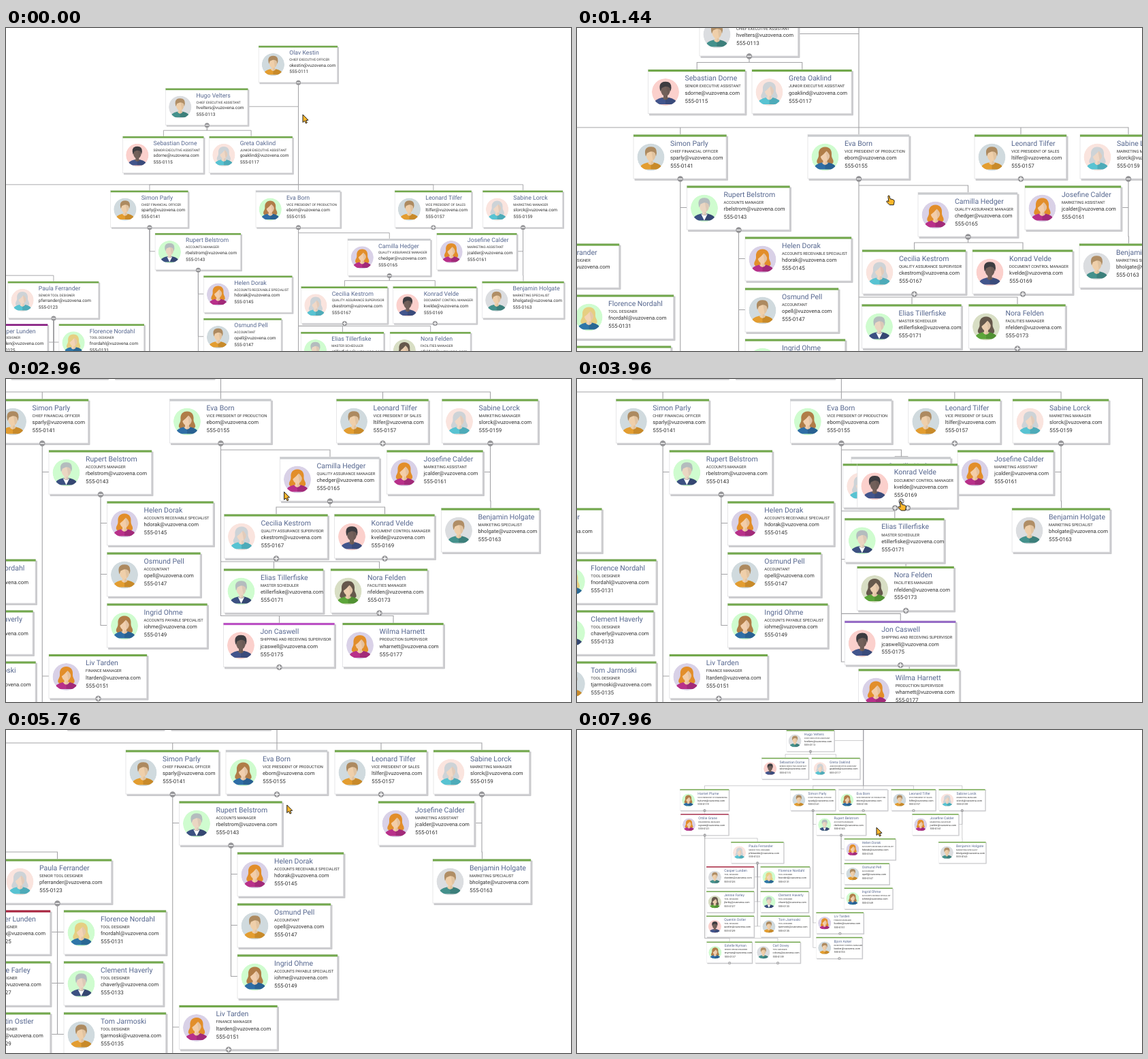
Recreate the animation shown at these times as an HTML page. Size 830 by 474 pixels, loop 8000 ms.

```html
<!DOCTYPE html>
<html lang="en">
<head>
<meta charset="utf-8">
<title>Organization chart</title>
<style>
html, body { margin: 0; width: 100%; height: 100%; overflow: hidden; background: #fff; }
svg { display: block; width: 100vw; height: 100vh; }
text { font-family: Roboto, Arial, sans-serif; text-rendering: geometricPrecision; fill: #333; }
.name { font-size: 10.5px; fill: #56678f; }
.title { font-size: 5.75px; }
.mail { font-size: 7.75px; }
.phone { font-size: 8px; }
</style>
</head>
<body>
<svg id="stage" viewBox="0 0 830 474">
  <defs><clipPath id="disc"><circle r="20"/></clipPath></defs>
  <g id="world">
    <path id="links" fill="none" stroke="#a3a3a6" stroke-width="1.1"/>
    <g id="cards"></g>
    <g id="knobs"></g>
  </g>
  <g id="cursor" stroke="#222" stroke-width="1" stroke-linejoin="round" fill="#fdb72b">
    <path id="arrow" d="M0 0V11.5L2.7 9.2 4.5 13 6.4 12 4.7 8.5 8 8.2Z"/>
    <path id="hand" d="M-1 0Q0-1.6 1.2 0L2 4 6.5 5.2Q8.5 5.8 8.3 8L7.3 13H1.2L-3 8.6Q-3.4 6.8-1.6 7.2L0 8.2Z"/>
  </g>
</svg>
<script>
const LOOP = 8000, H = 67.5, ROW = 75;
const $ = id => document.getElementById(id);

// background, hair, skin, shirt, hair style
const looks = {
  m1: ['#d0dade', '#ad8a60', '#efcfaa', '#e39d30', 'short'],
  m2: ['#dbdde0', '#b08e66', '#efcfaa', '#44918c', 'short'],
  m3: ['#fbd0cc', '#3d3c40', '#72605a', '#42558c', 'short'],
  m4: ['#cffccf', '#b4bcbe', '#ead6c2', '#3c5182', 'suit'],
  w1: ['#fae4de', '#cdd3d7', '#f0d8c6', '#58c3d2', 'long'],
  w2: ['#cffccf', '#b07d48', '#f1cfae', '#2f6ea6', 'long'],
  w3: ['#d9d1e7', '#e28e2a', '#f3cda8', '#b8308a', 'long'],
  w4: ['#d8dec4', '#66584c', '#ecceb0', '#5ca53a', 'long'],
  w5: ['#cffccf', '#e6cf82', '#f3d4b4', '#2f76a8', 'long']
};

// group shifts of the two collapses: [first, second]
const shifts = { U: [0, 0], D: [0, 109], R: [-81, -4], G: [-83, -12] };

// name, title, look, parent, group, x, y, width, flags (s: side link, p: folded)
const people = [
  ['Olav Kestin', 'CHIEF EXECUTIVE OFFICER', 'm1', -1, 'U', 5, -255, 140],
  ['Hugo Velters', 'CHIEF EXECUTIVE ASSISTANT', 'm2', 0, 'U', -159, -180, 146, 's'],
  ['Sebastian Dorne', 'SENIOR EXECUTIVE ASSISTANT', 'm3', 1, 'U', -234.5, -95.5, 143.5],
  ['Greta Oaklind', 'JUNIOR EXECUTIVE ASSISTANT', 'w1', 1, 'U', -82, -95.5, 147.5],
  ['Harriet Plume', 'VICE PRESIDENT OF ENGINEERING', 'w2', 0, 'D', -592.5, 0, 150],
  ['Ottilie Grane', 'ENGINEERING MANAGER', 'w3', 4, 'D', -590.5, ROW, 147],
  ['Paula Ferrander', 'SENIOR TOOL DESIGNER', 'w1', 5, 'D', -437, 160, 161],
  ['Casper Lunden', 'TOOL DESIGNER', 'm2', 6, 'D', -512, 235, 146, 's'],
  ['Jennie Farley', 'TOOL DESIGNER', 'w4', 6, 'D', -512, 310, 146, 's'],
  ['Quentin Ostler', 'TOOL DESIGNER', 'm3', 6, 'D', -512, 385, 146, 's'],
  ['Florence Nordahl', 'TOOL DESIGNER', 'w5', 6, 'D', -347, 235, 151, 's'],
  ['Clement Haverly', 'TOOL DESIGNER', 'm4', 6, 'D', -347, 310, 147, 's'],
  ['Tom Jarmoski', 'TOOL DESIGNER', 'm1', 6, 'D', -347, 385, 151, 's'],
  ['Estelle Nyman', 'SENIOR DESIGN ENGINEER', 'w2', 5, 'D', -511, 464, 139, 'p'],
  ['Carl Dovey', 'TOOL MANAGER', 'm2', 5, 'D', -364, 464, 139, 'p'],
  ['Simon Parly', 'CHIEF FINANCIAL OFFICER', 'm1', 0, 'D', -256, 0, 137.5],
  ['Rupert Belstrom', 'ACCOUNTS MANAGER', 'm4', 15, 'D', -177.5, ROW, 152, 's'],
  ['Helen Dorak', 'ACCOUNTS RECEIVABLE SPECIALIST', 'w3', 16, 'D', -92, 150, 157, 's'],
  ['Osmund Pell', 'ACCOUNTANT', 'm1', 16, 'D', -92, 225, 138, 's'],
  ['Ingrid Ohme', 'ACCOUNTS PAYABLE SPECIALIST', 'w2', 16, 'D', -92, 300, 148, 's'],
  ['Liv Tarden', 'FINANCE MANAGER', 'w3', 15, 'D', -177.5, 374.5, 145, 'sp'],
  ['Bjorn Asker', 'INVENTORY CONTROL MANAGER', 'm1', 15, 'D', -177.5, 450, 141, 'sp'],
  ['Eva Born', 'VICE PRESIDENT OF PRODUCTION', 'w2', 0, 'U', 0, 0, 150],
  ['Leonard Tilfer', 'VICE PRESIDENT OF SALES', 'm1', 0, 'R', 245, 0, 136, 'p'],
  ['Sabine Lorck', 'MARKETING MANAGER', 'w1', 0, 'G', 400, 0, 142],
  ['Josefine Calder', 'MARKETING ASSISTANT', 'w3', 24, 'G', 319, ROW, 142, 's'],
  ['Benjamin Holgate', 'MARKETING SPECIALIST', 'm2', 24, 'G', 399, 160, 145],
  ['Camilla Hedger', 'QUALITY ASSURANCE MANAGER', 'w3', 22, 'K', 162, 85, 147],
  ['Cecilia Kestrom', 'QUALITY ASSURANCE SUPERVISOR', 'w1', 27, 'Q', 80, 169, 153, 'p'],
  ['Konrad Velde', 'DOCUMENT CONTROL MANAGER', 'm3', 27, 'Q', 242, 169, 148, 'p'],
  ['Elias Tillerfiske', 'MASTER SCHEDULER', 'm4', 22, 'K', 79.5, 249, 147],
  ['Nora Felden', 'FACILITIES MANAGER', 'w4', 22, 'K', 236.5, 249, 143, 'p'],
  ['Jon Caswell', 'SHIPPING AND RECEIVING SUPERVISOR', 'm3', 22, 'K', 79, 328.5, 164, 'p'],
  ['Wilma Harnett', 'PRODUCTION SUPERVISOR', 'w3', 22, 'K', 254, 328.5, 149]
];
const CHIEF = 5, DESIGNER = 7, PRODUCTION = 22, QUALITY = 27, SHIPPING = 32;

function avatar(look) {
  const [bg, hair, skin, shirt, style] = looks[look];
  const long = style === 'long';
  const back = long
    ? `<path d="M0-15C7-15 10-10 9.5-4C9 2 13 3 12 8Q10 11 6 10H-6Q-10 11-12 8C-13 3-9 2-9.5-4C-10-10-7-15 0-15Z" fill="${hair}"/>` : '';
  const top = long
    ? `<path d="M-7.5 0Q-9-14 0-14T7.5 0Q6-6 2-9Q-2-4-7.5 0Z" fill="${hair}"/>`
    : `<path d="M-7.5-1Q-11-13-3-15Q9-17 8.5-6L7.5-1 6.2-6Q3-9-1-8L-5.5-6Z" fill="${hair}"/>`;
  const collar = style === 'suit'
    ? '<path d="M-5 8L0 18 5 8 2 10H-2Z" fill="#fff"/>'
    : `<path d="M-5 8Q0 15 5 8Z" fill="${skin}"/>`;
  return `<g transform="translate(25.5 33)" clip-path="url(#disc)"><circle r="20" fill="${bg}"/>${back}
    <path d="M-17 18Q-16 10-5 8H5Q16 10 17 18Z" fill="${shirt}"/>
    <path d="M0 8H5Q16 10 17 18H0Z" fill="#000" opacity=".12"/>
    ${collar}<rect x="-3" y="3" width="6" height="7" fill="${skin}"/>
    <ellipse cy="-3.5" rx="7" ry="9.5" fill="${skin}"/>
    <path d="M0-13A7 9.5 0 0 1 0 6V12L3 10V4Z" fill="#000" opacity=".06"/>${top}</g>`;
}

function cardMarkup(p, i) {
  const [first, last] = p.name.split(' ');
  const mail = (first[0] + last).toLowerCase() + '@vuzovena.com';
  const line = (cls, y, s) => `<text class="${cls}" x="54" y="${y}">${s}</text>`;
  return `<rect x="1.5" y="2" width="${p.w}" height="${H - 2}" rx="1" fill="#cbcbce"/>
    <rect width="${p.w - 1.5}" height="${H - 3}" fill="#fff" stroke="#dcdcde" stroke-width=".7"/>
    <rect class="bar" width="${p.w - .8}" height="3.1" fill="#72a84c"/>` + avatar(p.look) +
    line('name', 16, p.name) + line('title', 26.4, p.title) +
    line('mail', 36.6, mail) + line('phone', 48.5, '555-01' + (11 + 2 * i));
}

function add(parent, html) {
  const g = document.createElementNS('http://www.w3.org/2000/svg', 'g');
  g.innerHTML = html;
  return parent.appendChild(g);
}

let slot = 0;
const nodes = people.map(([name, title, look, up, group, x0, y0, w, flags = ''], i) => {
  const p = { name, title, look, up, group, x0, y0, w, side: flags.includes('s'), folded: flags.includes('p') };
  if (group === 'K') p.y1 = 85 + 80 * slot++;
  p.el = add($('cards'), cardMarkup(p, i));
  p.bar = p.el.querySelector('.bar');
  return p;
});
nodes.forEach((p, i) => {
  if (!p.folded && !nodes.some(c => c.up === i)) return;
  p.knob = add($('knobs'), `<circle r="4.2" fill="#949497"/>
    <path d="M-3 0H3" stroke="#fff" stroke-width="1.3"/>
    <path class="plus" d="M0-3V3" stroke="#fff" stroke-width="1.3"/>`);
  p.plus = p.knob.querySelector('.plus');
});
nodes[PRODUCTION].bar.setAttribute('fill', '#c9cbce');
nodes[QUALITY].bar.setAttribute('fill', '#c9cbce');
nodes[CHIEF].bar.setAttribute('fill', '#a8324f');

const clamp = v => Math.min(1, Math.max(0, v));
const mix = (a, b, k) => a + (b - a) * k;
const span = (t, a, b) => clamp((t - a) / (b - a));
const ease = k => k < .5 ? 2 * k * k : 1 - 2 * (1 - k) ** 2;

function along(keys, t) {
  let i = 1;
  while (i < keys.length - 1 && t > keys[i][0]) i++;
  const a = keys[i - 1], b = keys[i], k = span(t, a[0], b[0]);
  return [mix(a[1], b[1], k), mix(a[2], b[2], k)];
}

const panKeys = [[640, 353.2, 260.7], [1040, 344.5, 215], [1200, 339, 156.5],
  [1500, 339, 156.5], [2080, 272, 64.5], [2500, 240.5, 29.5]];
const cursorKeys = [[0, 436, 127], [520, 436, 127], [640, 451, 202], [1040, 442, 156],
  [1200, 437, 98], [1500, 463, 283], [2080, 396, 191], [2500, 364, 156], [2700, 364, 156],
  [3350, 475, 180], [4250, 475, 180], [4650, 397, 94], [5450, 397, 94], [6400, 445, 143],
  [7040, 445, 143], [7120, 440, 143]];
const handTimes = [[600, 2560], [3300, 4300], [4600, 5500]];

function camera(t, p1) {
  let [x, y] = along(panKeys, t), s = 1;
  x += 82.5 * p1;
  const zoom = (k, fx, fy) => {
    s *= k;
    x = fx + (x - fx) * k;
    y = fy + (y - fy) * k;
  };
  if (t < 520) zoom(1.2 ** (span(t, 100, 520) - 1), 436, 128);
  if (t > 7075) zoom(1.2 ** (-4 * span(t, 7075, 7960)), 441.7, 140.3);
  return [x, y, s];
}

function place(p, p1, p2) {
  if (p.group === 'K') {
    p.x = mix(mix(p.x0, 80, p1), 75 - p.w / 2, p2);
    p.y = mix(mix(p.y0, p.y1, p1), 0, p2);
    p.shown = p2 < 1;
  } else if (p.group === 'Q') {
    const q = nodes[QUALITY];
    p.x = q.x + mix(p.x0 - q.x0, (q.w - p.w) / 2, p1);
    p.y = q.y + mix(p.y0 - q.y0, 0, p1);
    p.shown = p1 < 1;
  } else {
    const [a, b] = shifts[p.group];
    p.x = p.x0 + a * p1 + b * p2;
    p.y = p.y0;
    p.shown = true;
  }
}

function link(p) {
  const up = nodes[p.up];
  if (!up || !p.shown) return '';
  const sx = up.x + up.w / 2, cx = p.x + p.w / 2, start = `M${sx} ${up.y + H - 2}`;
  if (p.side) return `${start}V${p.y + 32}H${cx < sx ? p.x + p.w : p.x}`;
  return `${start}V${p.y - 10.5}H${cx}V${p.y}`;
}

function draw(t) {
  const p1 = ease(span(t, 3506, 4106)), p2 = ease(span(t, 4807, 5407));
  const [x, y, s] = camera(t, p1);
  $('world').setAttribute('transform', `translate(${x} ${y}) scale(${s})`);
  nodes.forEach((p, i) => {
    place(p, p1, p2);
    const show = p.shown ? 'inline' : 'none';
    p.el.setAttribute('transform', `translate(${p.x} ${p.y})`);
    p.el.setAttribute('display', show);
    if (!p.knob) return;
    const folded = p.folded || (i === QUALITY && p1 > 0) || (i === PRODUCTION && p2 > 0);
    p.knob.setAttribute('transform', `translate(${p.x + p.w / 2} ${p.y + 65})`);
    p.knob.setAttribute('display', show);
    p.plus.setAttribute('display', folded ? 'inline' : 'none');
  });
  $('links').setAttribute('d', nodes.map(link).join(''));
  nodes[SHIPPING].bar.setAttribute('fill', t < 3000 ? '#bb50c4' : '#966cc6');
  nodes[DESIGNER].bar.setAttribute('fill', t < 3000 ? '#85177f' : '#a8243f');

  const hand = handTimes.some(([a, b]) => t >= a && t < b);
  $('cursor').setAttribute('transform', `translate(${along(cursorKeys, t).join(' ')})`);
  $('hand').setAttribute('display', hand ? 'inline' : 'none');
  $('arrow').setAttribute('display', hand ? 'none' : 'inline');
}

const began = performance.now();
function tick() {
  draw((performance.now() - began) % LOOP);
  requestAnimationFrame(tick);
}
draw(0);
requestAnimationFrame(tick);
</script>
</body>
</html>
```
